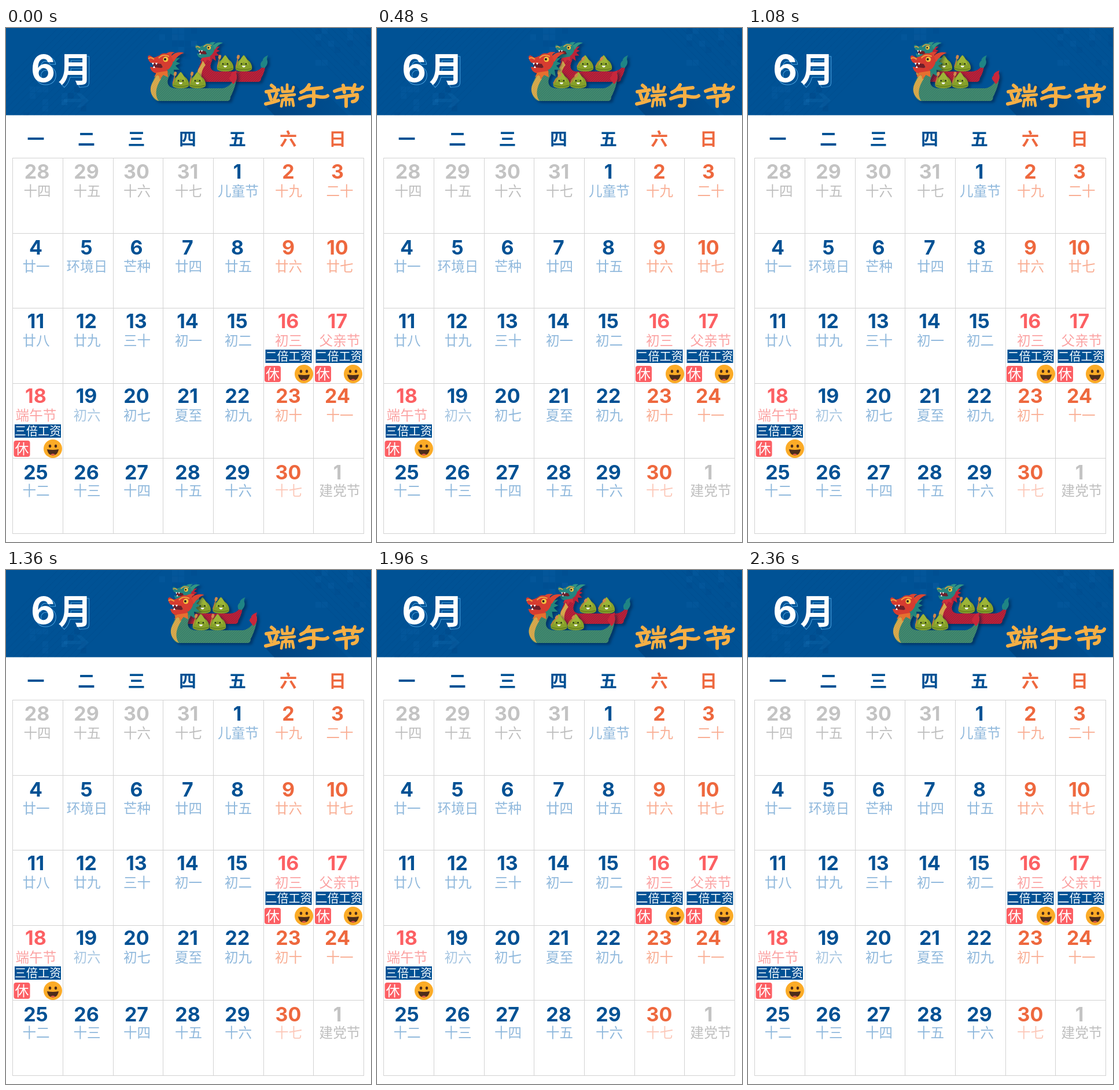
Recreate the animation shown at these times as an HTML page. Size 631 by 887 pixels, loop 2.4 s.

```html
<!DOCTYPE html>
<html lang="zh-CN">
<head>
<meta charset="utf-8">
<title>6月</title>
<style>
  html, body { margin: 0; width: 100%; height: 100%; overflow: hidden; background: #fff; }
  svg { display: block; width: 631px; height: 887px; }
  text { font-family: "Noto Sans CJK SC", "Noto Sans CJK", sans-serif; text-anchor: middle; }
  .num { font: 700 34px Inter, sans-serif; }
  .six { font: 700 65px Inter, sans-serif; }
  .sub { font-size: 23.6px; font-weight: 300; }
  .week { font-size: 30px; font-weight: 700; }
  .boat { filter: drop-shadow(4px 3px 2px rgba(0, 25, 60, .5)); }
  .ink { fill: none; stroke: #f6af45; stroke-width: 6; stroke-linecap: round; stroke-linejoin: round; }
  #front { --skin: #d63c30; --horn: #dc4632; --mane: #23857c; --beard: #e5702f; }
  #back { --skin: #25857f; --horn: #2f9585; --mane: #bd2338; --beard: #cf2f3b; }
</style>
</head>
<body>
<svg viewBox="0 0 631 887">
  <defs>
    <pattern id="scales" width="4" height="4" patternUnits="userSpaceOnUse">
      <path d="M0 4L4 0" stroke="#fff" stroke-opacity=".09"/>
    </pattern>
    <linearGradient id="fade">
      <stop stop-color="#00376f" stop-opacity=".55"/>
      <stop offset="1" stop-color="#00376f" stop-opacity="0"/>
    </linearGradient>
    <clipPath id="bar"><rect width="631" height="150.500"/></clipPath>
    <path id="hullFront" d="M262 70C259 86 249 95 250 108C252 120 258 126 264 126H383Q388 126 388 119C394 108 399 93 399 79C393 93 386 102 375 104H292C279 103 277 93 282 84C287 75 288 64 284 56L266 60Z"/>
    <path id="hullBack" d="M340 48C338 62 330 70 331 79Q334 93 343 93H435Q441 93 441 87C446 78 449 70 448 61C442 70 436 74 428 75H363C354 74 352 67 355 60Q359 51 356 43Z"/>

    <g id="bun">
      <path d="M0-15C3-14 4-9 8-6C13-2 15 4 14 9Q12 13 0 13T-14 9C-15 4-13-2-8-6C-4-9-3-14 0-15Z" fill="#86a02a"/>
      <path d="M0-15C-4-10-8-5-9 3L0-3L9 3C8-5 4-10 0-15Z" fill="#9db537"/>
      <path d="M-13 8Q0 12 13 8" fill="none" stroke="#647f20" stroke-width="1.500"/>
      <circle cx="-4" cy="0" r="1.400" fill="#26351a"/>
      <circle cx="4" cy="0" r="1.400" fill="#26351a"/>
      <path d="M-3 3H3Q2.500 6 0 6T-3 3Z" fill="#fff"/>
    </g>

    <g id="dragon">
      <path d="M284 54L301 51L294 58L301 61L293 65L300 72L290 72L292 84L280 76L276 62Z" fill="var(--mane)"/>
      <path d="M274 47Q280 39 292 42Q286 44 286 48Q295 39 308 43Q297 46 290 58L278 57Z" fill="var(--horn)"/>
      <path d="M254 60L271 61L270 71L254 70Z" fill="#6d1f2a"/>
      <path d="M245 50Q246 46 250 48L255 51Q264 49 268 45Q277 41 285 48L289 56Q288 66 280 72L272 69L268 62L250 60Q246 57 245 50Z" fill="var(--skin)"/>
      <path d="M249 67L268 69L276 66L280 76Q268 83 256 77Q250 74 249 67Z" fill="var(--skin)"/>
      <path d="M260 77L256 85L264 81L266 89L272 81L280 85L279 74Z" fill="var(--beard)"/>
      <path d="M252 60l2 4 2-4zm6 0l2 4 2-4zM254 69l2-4 2 4z" fill="#fff"/>
      <path d="M246 53Q250 49 256 54M264 52Q271 44 282 49" fill="none" stroke="#eda33f" stroke-width="2"/>
      <circle cx="276" cy="54" r="4.500" fill="#f4c441"/>
      <circle cx="275" cy="54" r="2" fill="#222"/>
    </g>

    <g id="face">
      <circle r="16" fill="#fbab27"/>
      <ellipse cx="-5" cy="-4.500" rx="2.200" ry="2.700" fill="#4d2c1a"/>
      <ellipse cx="5" cy="-4.500" rx="2.200" ry="2.700" fill="#4d2c1a"/>
      <path d="M-10 1Q0 3 10 1C9 8 5 11.500 0 11.500S-9 8-10 1Z" fill="#4d2c1a"/>
      <path d="M-4 10Q0 7 4 10Q2 11.500 0 11.500T-4 10Z" fill="#e2574c"/>
    </g>
  </defs>

  <g clip-path="url(#bar)">
    <rect width="631" height="151" fill="#005295"/>
    <g id="decor"></g>
    <path d="M450 136L498 96L553 151H464ZM507 120L558 117L592 151H536ZM587 137L617 103L631 117V151H600Z" fill="url(#fade)"/>
  </g>

  <g font-weight="700" fill="#fff">
    <g fill="none" stroke="#4ba3e0" transform="translate(4 4)">
      <text class="six" x="64" y="93">6</text>
      <text x="119.500" y="93" font-size="59">月</text>
    </g>
    <text class="six" x="64" y="93">6</text>
    <text x="119.500" y="93" font-size="59">月</text>
  </g>

  <g class="ink" role="img" aria-label="端午节">
    <path d="M459 99L464 103M450 110L471 107M455 114L458 123M468 113L464 123M449 131Q460 129 471 125"/>
    <path d="M486 98V109M477 103L478 110L495 109L497 102M475 117L499 115M486 117L482 123M476 135L478 124L495 123L497 134" stroke-width="4.800"/>
    <path d="M484 125V134M490 125V133" stroke-width="3.500"/>
    <path d="M524 98Q520 107 510 111M520 106L546 103M508 122Q525 115 538 118T556 117M532 106V129Q532 136 523 134"/>
    <path d="M568 109Q586 102 600 105T616 102M583 99L585 111M603 98L599 110M572 120L607 115Q609 126 599 127M588 119V135"/>
  </g>

  <g class="boat" id="back">
    <use href="#hullBack" fill="#b01b34"/>
    <path d="M340 56C338 66 330 70 331 79L340 93C336 82 338 72 345 64Z" fill="#d3a548"/>
    <use href="#hullBack" fill="url(#scales)"/>
    <path d="M441 68Q438 60 444 56Q443 51 453 47Q450 53 452 57Q453 63 447 69Z" fill="#1f8585"/>
    <use href="#dragon" transform="translate(141 -7) scale(.76)"/>
    <g class="crew" data-x="379 411" data-y="62"></g>
  </g>

  <g class="boat" id="front">
    <use href="#hullFront" fill="#3a8269"/>
    <path d="M261 78C258 90 249 96 250 108C251 116 256 122 264 126C256 114 260 100 268 88Z" fill="#d3a548"/>
    <use href="#hullFront" fill="url(#scales)"/>
    <path d="M389 92Q383 86 389 82Q388 77 399 73Q397 79 399 83Q400 90 393 97Z" fill="#c9273b"/>
    <use href="#dragon"/>
    <g class="crew" data-x="302 331" data-y="91"></g>
  </g>

  <g id="calendar"></g>
</svg>
<script>
const NS = 'http://www.w3.org/2000/svg';
const $ = id => document.getElementById(id);
const add = (parent, tag, attrs, label) => {
  const el = document.createElementNS(NS, tag);
  for (const k in attrs) el.setAttribute(k, attrs[k]);
  if (label !== undefined) el.textContent = label;
  return parent.appendChild(el);
};

// Faint banner pattern
const decor = $('decor');
let seed = 7;
const rnd = () => (seed = seed * 16807 % 2147483647) / 2147483647;
const blocks = [[30, 90, 110, 60], [265, 0, 70, 50], [535, 0, 96, 70]];
for (const [x, y, w, h] of blocks) {
  for (let i = 0; i < 18; i++) {
    add(decor, 'rect', {
      x: x + Math.floor(rnd() * w / 11) * 11, y: y + Math.floor(rnd() * h / 11) * 11,
      width: 10, height: 10, fill: i % 2 ? '#1873b5' : '#003e7c', opacity: .13
    });
  }
}
for (let i = 0; i < 16; i++) {
  add(decor, 'path', { d: `M${i * 12 - 60} 151l150-151M${490 + i * 12} 0l150 151`, stroke: '#00386f', opacity: .14 });
}
add(decor, 'path', { d: 'M100 122h30l-8-9h8l13 12-13 12h-8l8-9h-30z', fill: '#2580bf', opacity: .15 });

// Calendar
const BLUE = '#005194', ORANGE = '#ee683e', RED = '#fc6063', GREY = '#c3c3c3';
const PALE = { [BLUE]: '#8fb8dc', [ORANGE]: '#f9ae94', [RED]: '#fba3a3', [GREY]: '#bebebe' };
const numX = [51.5, 139, 225.5, 314, 400, 488, 573];
const subX = [52, 140, 226.5, 315.5, 401.5, 488.5, 577];
const numY = [248, 378.5, 506, 635, 767];
const subY = [281, 411, 539, 668, 798];
const weeks = [
  '十四 十五 十六 十七 儿童节 十九 二十',
  '廿一 环境日 芒种 廿四 廿五 廿六 廿七',
  '廿八 廿九 三十 初一 初二 初三 父亲节',
  '端午节 初六 初七 夏至 初九 初十 十一',
  '十二 十三 十四 十五 十六 十七 建党节'
];
const cal = $('calendar');

[...'一二三四五六日'].forEach((c, i) =>
  add(cal, 'text', { class: 'week', x: numX[i], y: 201.5, fill: i > 4 ? ORANGE : BLUE }, c));

const grid = [11.5, 98.5, 185.5, 271.5, 358.5, 445.5, 531.5, 618.5].map(x => `M${x} 224V873`)
  .concat([224.5, 354.5, 483.5, 613.5, 742.5, 872.5].map(y => `M11 ${y}H619`)).join('');
add(cal, 'path', { d: grid, stroke: '#d2d2d2' });

weeks.forEach((week, r) => week.split(' ').forEach((name, c) => {
  const n = r * 7 + c - 3;
  const day = n < 1 ? n + 31 : n > 30 ? n - 30 : n;
  const color = n < 1 || n > 30 ? GREY : n > 15 && n < 19 ? RED : c > 4 ? ORANGE : BLUE;
  const shift = n === -3 ? 2 : 0;
  const pale = n === 30 ? '#fcc8b9' : n === 19 ? '#a8c7e2' : PALE[color];
  add(cal, 'text', { class: 'num', x: numX[c] + shift, y: numY[r] + 12.4, fill: color }, day);
  add(cal, 'text', { class: 'sub', x: subX[c] + shift, y: subY[r] + 9, fill: pale }, name);
}));

for (const [x, y, pay, face] of [[447, 555, '二倍工资', 515], [534, 555, '二倍工资', 600], [13.5, 684, '三倍工资', 81]]) {
  add(cal, 'rect', { x: x + 1.5, y, width: 80, height: 23, fill: BLUE });
  add(cal, 'text', { x: x + 41.5, y: y + 18.5, 'font-size': 20, fill: '#fff' }, pay);
  add(cal, 'rect', { x, y: y + 28, width: 28, height: 28, rx: 4, fill: '#fc5f64' });
  add(cal, 'text', { x: x + 14, y: y + 51, 'font-size': 24, fill: '#fff' }, '休');
  add(cal, 'use', { href: '#face', x: face, y: y + 42 });
}

// Crew with paddles
const paddles = [];
for (const crew of document.querySelectorAll('.crew')) {
  const y = +crew.dataset.y;
  for (const x of crew.dataset.x.split(' ').map(Number)) {
    add(crew, 'use', { href: '#bun', x, y });
    const oar = add(crew, 'g', {});
    add(oar, 'path', { d: 'M0 2V-14', stroke: '#bd7b3d', 'stroke-width': 1.8 });
    add(oar, 'rect', { x: -2.4, y: -19, width: 4.8, height: 7, rx: 2, fill: '#d0894a' });
    paddles.push({ oar, x: x - 13, y: y + 3 });
  }
}

// Time in ms, share of the full travel
const travel = [[0, 0], [240, .19], [480, .46], [800, .79], [1000, .94], [1160, 1],
  [1360, .95], [1720, .595], [2000, .3], [2160, .165], [2400, 0]];
const share = t => {
  const i = travel.findIndex(p => p[0] > t);
  const [t0, a] = travel[i - 1], [t1, b] = travel[i];
  return a + (b - a) * (t - t0) / (t1 - t0);
};

function draw(now) {
  const t = Math.floor(now % 2400 / 40) * 40;
  const p = share(t);
  $('front').setAttribute('transform', `translate(${36.8 * p} 0)`);
  $('back').setAttribute('transform', `translate(${-41.5 * p} 0)`);
  const angle = 27 - 14 * Math.cos(t / 1200 * 2 * Math.PI);
  for (const { oar, x, y } of paddles) {
    oar.setAttribute('transform', `translate(${x} ${y}) rotate(${angle})`);
  }
}

const start = performance.now();
function loop() {
  draw(performance.now() - start);
  requestAnimationFrame(loop);
}
loop();
</script>
</body>
</html>
```
